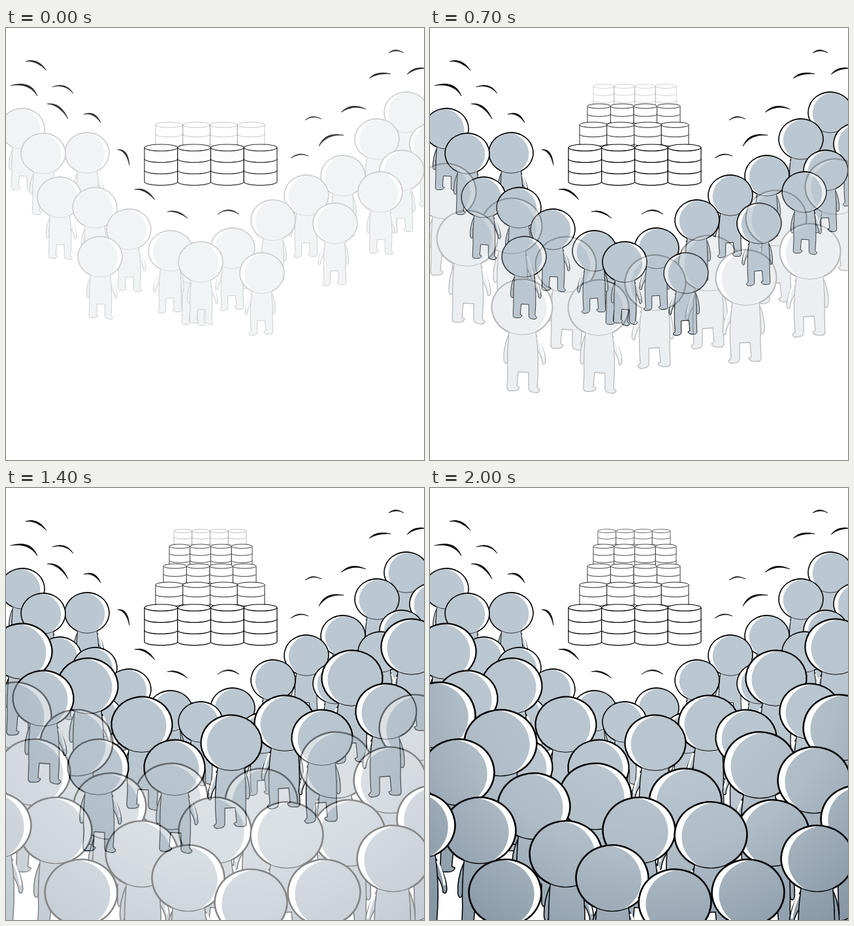
Recreate the animation shown at these times as an HTML page with a canvas. Size 640 by 661 pixels, loop 4100 ms.

```html
<!DOCTYPE html>
<html lang="en">
<head>
<meta charset="utf-8">
<title>Growing crowd</title>
<style>
html, body { margin: 0; width: 100%; height: 100%; overflow: hidden; background: #fff; }
canvas { display: block; }
</style>
</head>
<body>
<canvas id="stage" width="640" height="661"></canvas>
<script>
const W = 640, H = 661, LOOP = 4100, STEP = 100;
const ctx = document.getElementById('stage').getContext('2d');

// One person seen from behind, centred on the head, lit from the right.
const ellipse = (x, y, rx, ry, from = 0, to = 2 * Math.PI) => {
  const path = new Path2D();
  path.ellipse(x, y, rx, ry, 0, from, to);
  return path;
};
const person = {
  head: ellipse(0, 0, 46.5, 42.5),
  shade: ellipse(-9, 2, 46.5, 44),
  skull: ellipse(0, 0, 46.5, 42.5, 2.05, 2 * Math.PI + 1.09),
  neck: ellipse(0, 0, 46.5, 42.5, 1.09, 2.05),
  body: new Path2D('M-20 38 Q-23 70 -22 98 L-23 124 Q-22 129 -15 128 Q-6 129 -4 123 L-8 121 L-6 99 ' +
    'L10 100 L10 124 Q10 129 16 130 Q25 133 27 127 L23 123 Q27 80 21 38'),
  leftArm: new Path2D('M-21 43 Q-29 62 -28 81 Q-27 88 -23 85 Q-21 80 -22 66'),
  rightArm: new Path2D('M22 43 Q35 64 36 82 Q35 90 31 86 Q31 78 24 66'),
  glint: new Path2D('M24 47 Q31 62 33 76')
};

const glow = ctx.createRadialGradient(335, 270, 130, 335, 270, 500);
glow.addColorStop(0, '#bec9d1');
glow.addColorStop(0.45, '#afbcc6');
glow.addColorStop(1, '#8394a3');

function drawPerson(g, x, y, scale, mirrored, fill) {
  const matrix = new DOMMatrix([mirrored ? -scale : scale, 0, 0, scale, x, y]);
  const placed = name => {
    const path = new Path2D();
    path.addPath(person[name], matrix);
    return path;
  };
  const paint = (name, color) => { g.fillStyle = color; g.fill(placed(name)); };
  const line = (name, width, color = '#000') => {
    g.lineWidth = width * scale;
    g.strokeStyle = color;
    g.stroke(placed(name));
  };
  for (const part of ['leftArm', 'rightArm', 'body']) {
    paint(part, fill);
    line(part, 1.3);
  }
  line('glint', 3, '#fff');
  paint('head', '#fff');
  g.save();
  g.clip(placed('head'));
  paint('shade', fill);
  g.restore();
  line('skull', 2.2);
  line('neck', 1);
}

// Heads from back to front; people right of centre are mirrored, a third value flips that.
function makeCrowd(scale, fill, heads) {
  const layer = document.createElement('canvas');
  layer.width = W;
  layer.height = H;
  const g = layer.getContext('2d');
  g.lineCap = g.lineJoin = 'round';
  for (const [x, y, flip] of heads) drawPerson(g, x, y, scale, (x > 330) !== !!flip, fill);
  return layer;
}

const crowds = [
  { start: -170, end: 690, layer: makeCrowd(0.73, '#bcc8d1', [
    [613, 129], [25, 154], [568, 170], [652, 177], [124, 191], [57, 192], [606, 218], [516, 226],
    [573, 251, 1], [460, 256], [82, 259], [136, 275], [409, 294], [504, 299], [188, 308],
    [347, 337], [286, 360], [252, 341, 1], [144, 350], [298, 358], [392, 375]]) },
  { start: 490, end: 1280, layer: makeCrowd(1, '#bac6cf', [
    [621, 243], [24, 250], [530, 291], [125, 303], [57, 322], [582, 342], [427, 360],
    [208, 362], [484, 382], [345, 390], [141, 427], [258, 428]]) },
  { start: 950, end: 1900, layer: makeCrowd(1.19, glow, [
    [14, 348], [627, 367], [108, 390], [505, 424], [43, 435], [588, 447], [253, 472],
    [391, 480], [159, 487], [654, 506], [76, 524], [-17, 516], [320, 524], [525, 528],
    [430, 531], [208, 560], [593, 567], [279, 597], [115, 619], [487, 619], [375, 634]]) }
];

// Rows of four drums, back to front.
const rows = [
  { left: 257, right: 368, top: 63, start: 1000, end: 1950, color: '#444', width: 0.8 },
  { left: 250, right: 377, top: 86, start: 500, end: 1300, color: '#333', width: 0.9 },
  { left: 241, right: 383, top: 116, start: 200, end: 700, color: '#222', width: 0.9 },
  { left: 229, right: 396, top: 144, start: -150, end: 450, color: '#222', width: 1 },
  { left: 212, right: 415, top: 178, start: -800, end: 200, color: '#000', width: 1.2 }
];

function drawDrum(x, top, w) {
  const rx = w / 2, ry = w * 0.1, cx = x + rx, cy = top + ry, gap = w * 0.345;
  ctx.beginPath();
  ctx.ellipse(cx, cy, rx, ry, 0, Math.PI, 2 * Math.PI);
  ctx.lineTo(x + w, cy + 3 * gap);
  ctx.ellipse(cx, cy + 3 * gap, rx, ry, 0, 0, Math.PI);
  ctx.closePath();
  ctx.fill();
  ctx.stroke();
  for (let band = 0; band < 3; band++) {
    ctx.beginPath();
    ctx.ellipse(cx, cy + band * gap, rx, ry, 0, 0, Math.PI);
    ctx.stroke();
  }
}

function drawRow({ left, right, top, color, width }) {
  const w = (right - left) / 4;
  ctx.fillStyle = '#fff';
  ctx.strokeStyle = color;
  ctx.lineWidth = width;
  for (let i = 0; i < 4; i++) drawDrum(left + i * w, top, w);
}

// Distant heads: start, control and end of a tapered arc, then its thickness.
const arcs = [
  [30, 51, 49, 45, 62, 65, 5], [7, 88, 39, 79, 48, 104, 6], [71, 90, 92, 82, 103, 100, 4],
  [63, 116, 84, 113, 95, 139, 5], [119, 132, 137, 125, 145, 145, 5], [171, 186, 187, 184, 189, 210, 5],
  [197, 247, 215, 242, 228, 263, 5], [247, 281, 263, 276, 278, 291, 4], [324, 285, 341, 271, 357, 285, 4],
  [436, 199, 449, 188, 463, 196, 3], [458, 141, 468, 131, 483, 139, 3], [479, 181, 488, 158, 517, 164, 5],
  [513, 129, 528, 113, 551, 124, 5], [556, 77, 566, 65, 589, 70, 5], [586, 38, 596, 29, 609, 38, 4],
  [614, 71, 624, 57, 645, 62, 5]
];

function drawArcs() {
  ctx.fillStyle = ctx.strokeStyle = '#000';
  ctx.lineWidth = 0.6;
  for (const [x0, y0, cx, cy, x1, y1, thick] of arcs) {
    const side = x0 > 400 ? 0.6 : -0.6;
    ctx.beginPath();
    ctx.moveTo(x0, y0);
    ctx.quadraticCurveTo(cx, cy, x1, y1);
    ctx.quadraticCurveTo(cx + side * thick, cy + thick * 0.8, x0, y0);
    ctx.fill();
    ctx.stroke();
  }
}

const ramp = (t, { start, end }) => Math.min(1, Math.max(0, (t - start) / (end - start)));

function render(t) {
  ctx.globalAlpha = 1;
  ctx.fillStyle = '#fff';
  ctx.fillRect(0, 0, W, H);
  for (const row of rows) {
    ctx.globalAlpha = ramp(t, row);
    drawRow(row);
  }
  ctx.globalAlpha = ramp(t, { start: -800, end: 200 });
  drawArcs();
  for (const crowd of crowds) {
    ctx.globalAlpha = ramp(t, crowd);
    ctx.drawImage(crowd.layer, 0, 0);
  }
}

const begin = performance.now();
function tick() {
  const t = (performance.now() - begin) % LOOP;
  render(Math.min(2000, Math.floor(t / STEP) * STEP));
  requestAnimationFrame(tick);
}
tick();
</script>
</body>
</html>
```
